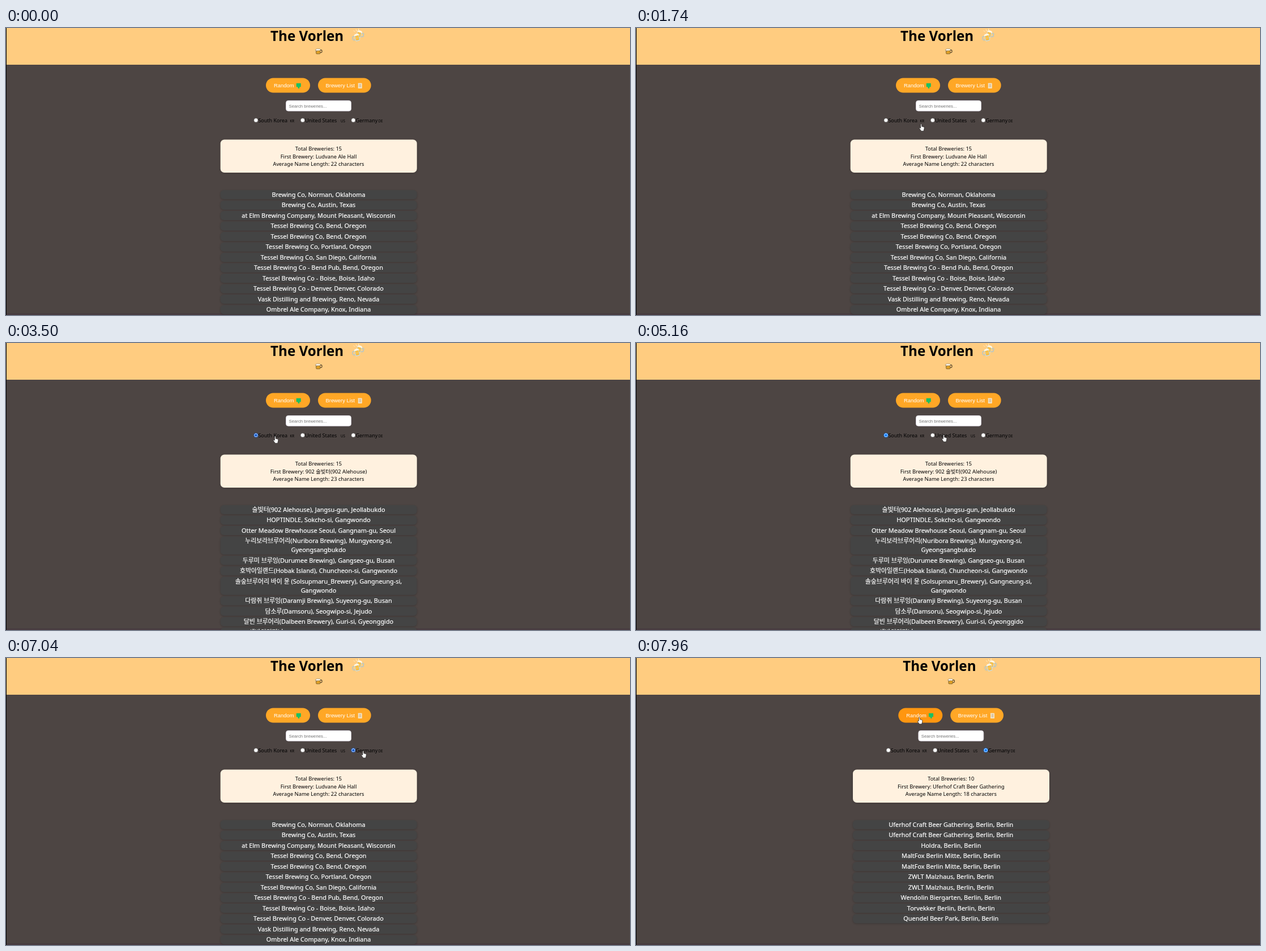
Recreate the animation shown at these times as an HTML page. Size 1102 by 508 pixels, loop 7990 ms.

```html
<!DOCTYPE html>
<html lang="en">
<head>
<meta charset="utf-8">
<title>Brewery finder</title>
<style>
  html, body { margin: 0; width: 100%; height: 100%; overflow: hidden; background: #4d4543; }
  svg { display: block; width: 100%; height: 100%; }
  text { font-family: "Noto Sans", "Noto Sans CJK KR", sans-serif; font-size: 9.3px; white-space: pre; }
  .mid { text-anchor: middle; }
  .title { font-size: 24.2px; font-weight: 700; }
  .ui { font-family: "Liberation Sans", Arial, sans-serif; font-size: 9.4px; fill: #fff; }
  .hint { font-size: 7.78px; fill: #757575; }
  .label { font-size: 9px; }
  .flag { font-size: 6.2px; }
  .item { font-size: 10.9px; fill: #fff; stroke: #fff; stroke-width: .2px; }
  .row { fill: #444; filter: drop-shadow(0 1px 1.5px rgba(0, 0, 0, .2)); }
  .card { fill: #fff1df; filter: drop-shadow(0 1px 2px rgba(0, 0, 0, .15)); }
</style>
</head>
<body>
<svg id="stage" viewBox="0 0 1102 508" preserveAspectRatio="none">
  <defs>
    <g id="mug">
      <path d="M11 5h3q2 0 2 2v4q0 2-2 2h-3" fill="none" stroke="#a9c6d2" stroke-width="1.6"/>
      <path d="M1 3h10v12q0 2-2 2H3q-2 0-2-2z" fill="#c5dce3"/>
      <path d="M2.3 5h7.4v9q0 1.3-1.3 1.3H3.6Q2.3 15.3 2.3 14z" fill="#f6b93b"/>
      <path d="M4.5 7v6M7.5 7v6" stroke="#ffd978" stroke-width="1"/>
      <path d="M.5 5q-1-3 2-3 2-2.5 4.5-.8 2-1 3.2.9 2.500.4 1.300 2.900z" fill="#fff6e2"/>
    </g>
    <g id="pint">
      <path d="M10 3h2q1.600 0 1.600 1.600v2q0 1.600-1.600 1.600h-2" fill="none" stroke="#4a3a20" stroke-width="1.300"/>
      <path d="M2 3h8v6.500q0 1.200-1.200 1.200H3.200Q2 10.700 2 9.500z" fill="#f3b22c" stroke="#3d2e18" stroke-width=".8"/>
      <path d="M4.600 5v4M7.300 5v4" stroke="#a56a10" stroke-width=".8"/>
      <path d="M1 4Q-.2 1.500 2.200 1.300 4-.4 6 .7 9-.2 9.800 1.400 11.300 3 10 4q-3 .8-5.500 0l-.6 1.800-1-.2-.2-1.500z" fill="#fff9ec" stroke="#5b4a30" stroke-width=".5"/>
    </g>
  </defs>
  <rect width="1102" height="508" fill="#4d4543"/>
  <rect width="1102" height="65" fill="#ffcc80"/>
  <rect y="505" width="1102" height="3" fill="#483c40"/>
  <rect width="1" height="508"/>
  <g id="page">
    <text class="title" x="467" y="22.600">The Vorlen</text>
    <g id="cheers">
      <use href="#mug" transform="translate(621 2.500) rotate(16) scale(.8)"/>
      <use href="#mug" transform="translate(623 8.500) rotate(-14) scale(-.8 .8)"/>
      <path d="M618 2.500l1.200 3M623 1l-.6 3M614 4.500l2 2" stroke="#fff4d6" stroke-width="1"/>
    </g>
    <use href="#pint" transform="translate(546 36.300) scale(.88)"/>
    <rect id="random" x="459" y="88.500" width="78" height="26" rx="13" fill="#ffa726"/>
    <rect x="551" y="88.500" width="93.700" height="26" rx="13" fill="#ffa726"/>
    <text class="ui" x="473" y="105.200">Random</text>
    <text class="ui" x="564.500" y="105.200">Brewery List</text>
    <path d="M513 98h7.500v6h-2.500v2.700h-1.800l-.7-2.700H513z" fill="#18c063" stroke="#18c063" stroke-width=".6" stroke-linejoin="round"/>
    <path d="M622 97.500h6q1.200.4.800 2v6q.4 1.500-1 1.500h-5.600q-1.200-.8-.4-2v-5.600q-.8-1.400.2-1.900z" fill="#f3e3c3"/>
    <path d="M623.500 100h3.600M623.500 102h3.600M623.500 104h3.600" stroke="#a98f6b" stroke-width=".7"/>
    <rect x="494.500" y="128.500" width="115" height="18.500" rx="4" fill="#fff" stroke="#dcd8e4" stroke-width=".8"/>
    <text class="ui hint" x="499.500" y="140.700">Search breweries...</text>
    <g id="radios"></g>
    <rect class="card" x="378.700" y="197.500" width="347" height="58.500" rx="7"/>
    <g id="stats"></g>
    <g id="lists"></g>
  </g>
  <g id="cursor" stroke="#1d1a1a" stroke-width=".7" stroke-linejoin="round" fill="#fff">
    <path id="hand" d="M2.400 1.300Q3.400-.4 4.400 1.300V4.700L7.700 5.600Q9 6 8.900 7.300L8.300 10.500 7.600 12.900H3.400L.6 9Q-.3 7.500.8 7 1.600 6.800 2.400 7.900Z"/>
    <path id="arrow" d="M3 0V9.600L5.100 7.700 6.500 10.900 7.900 10.300 6.500 7.200H9.300Z"/>
  </g>
</svg>
<script>
const LOOP = 7990;
const $ = id => document.getElementById(id);

function add(parent, tag, attrs, content) {
  const el = document.createElementNS("http://www.w3.org/2000/svg", tag);
  for (const key in attrs) el.setAttribute(key, attrs[key]);
  if (content) el.textContent = content;
  parent.appendChild(el);
  return el;
}

const countries = {
  KR: {
    total: 15, first: "902 술빚터(902 Alehouse)", average: 23,
    items: [
      "술빚터(902 Alehouse), Jangsu-gun, Jeollabukdo",
      "HOPTINDLE, Sokcho-si, Gangwondo",
      "Otter Meadow Brewhouse Seoul, Gangnam-gu, Seoul",
      "누리보라브루어리(Nuribora Brewing), Mungyeong-si,\nGyeongsangbukdo",
      "두루미 브루잉(Durumee Brewing), Gangseo-gu, Busan",
      "호박아일랜드(Hobak Island), Chuncheon-si, Gangwondo",
      "솔숲브루어리 바이 윤 (Solsupmaru_Brewery), Gangneung-si,\nGangwondo",
      "다람쥐 브루잉(Daramji Brewing), Suyeong-gu, Busan",
      "담소루(Damsoru), Seogwipo-si, Jejudo",
      "달빈 브루어리(Dalbeen Brewery), Guri-si, Gyeonggido",
      "새바위컴퍼니(Saebawi Beer Co), Jongno-gu, Seoul"
    ]
  },
  US: {
    total: 15, first: "Ludvane Ale Hall", average: 22,
    items: [
      "Brewing Co, Norman, Oklahoma",
      "Brewing Co, Austin, Texas",
      "at Elm Brewing Company, Mount Pleasant, Wisconsin",
      "Tessel Brewing Co, Bend, Oregon",
      "Tessel Brewing Co, Bend, Oregon",
      "Tessel Brewing Co, Portland, Oregon",
      "Tessel Brewing Co, San Diego, California",
      "Tessel Brewing Co - Bend Pub, Bend, Oregon",
      "Tessel Brewing Co - Boise, Boise, Idaho",
      "Tessel Brewing Co - Denver, Denver, Colorado",
      "Vask Distilling and Brewing, Reno, Nevada",
      "Ombrel Ale Company, Knox, Indiana"
    ]
  },
  DE: {
    total: 10, first: "Uferhof Craft Beer Gathering", average: 18,
    items: [
      "Uferhof Craft Beer Gathering, Berlin, Berlin",
      "Uferhof Craft Beer Gathering, Berlin, Berlin",
      "Holdra, Berlin, Berlin",
      "MaltFox Berlin Mitte, Berlin, Berlin",
      "MaltFox Berlin Mitte, Berlin, Berlin",
      "ZWLT Malzhaus, Berlin, Berlin",
      "ZWLT Malzhaus, Berlin, Berlin",
      "Wendolin Biergarten, Berlin, Berlin",
      "Torvekker Berlin, Berlin, Berlin",
      "Quendel Beer Park, Berlin, Berlin"
    ]
  }
};

for (const data of Object.values(countries)) {
  data.group = add($("lists"), "g", {});
  let y = 287;
  for (const item of data.items) {
    const lines = item.split("\n");
    const height = 15.9 * lines.length;
    add(data.group, "rect", { class: "row", x: 378.7, y, width: 347, height, rx: 6 });
    lines.forEach((line, i) =>
      add(data.group, "text", { class: "item mid", x: 552, y: y + 11.9 + 15.8 * i }, line));
    y += height + 2.6;
  }
}

const stats = [217.3, 230.7, 244].map(y => add($("stats"), "text", { class: "mid", x: 552, y }));

const radios = [
  { code: "KR", name: "South Korea", x: 437, flag: 501.5, end: 511 },
  { code: "US", name: "United States", x: 519.5, flag: 591, end: 600.5 },
  { code: "DE", name: "Germany", x: 609, flag: 657.5, end: 666 }
];
for (const r of radios) {
  r.ring = add($("radios"), "circle", { cx: r.x + 4.4, cy: 163.2, r: 3.5, fill: "#fff" });
  r.dot = add($("radios"), "circle", { cx: r.x + 4.4, cy: 163.2, r: 2.2 });
  add($("radios"), "text", { class: "label", x: r.x + 8.4, y: 166.7 }, r.name);
  add($("radios"), "text", { class: "flag", x: r.flag, y: 166.7 }, r.code);
}

// Pointer stops: time, x, y
const path = [
  [120, 1024, 498], [200, 985, 400], [320, 880, 230], [430, 800, 140], [530, 765, 114],
  [840, 765, 114], [930, 690, 135], [1030, 591, 163],
  [1470, 591, 163], [1600, 562, 168], [1740, 500.5, 169.5], [1850, 482, 167], [1950, 472, 164.5],
  [4600, 472, 164.5], [4720, 512, 166], [4850, 540, 162],
  [5950, 540, 162], [6050, 565, 165], [6190, 604.5, 164], [6280, 623, 165],
  [6520, 623, 165], [6650, 627, 160], [6770, 627.5, 164],
  [7270, 627.5, 164], [7450, 600, 150], [7700, 520, 112], [7850, 501, 100], [7960, 497, 104]
];

function pointerAt(t) {
  const i = path.findIndex(p => p[0] > t);
  if (i < 0) return path[path.length - 1].slice(1);
  if (i === 0) return path[0].slice(1);
  const [a, b] = [path[i - 1], path[i]];
  const k = (t - a[0]) / (b[0] - a[0]);
  return [a[1] + (b[1] - a[1]) * k, a[2] + (b[2] - a[2]) * k];
}

const show = (el, on) => el.setAttribute("display", on ? "inline" : "none");
const clamp = v => Math.max(0, Math.min(1, v));

function draw(t) {
  const checked = t < 3290 ? "" : t < 5300 ? "KR" : t < 7040 ? "US" : "DE";
  const listed = t >= 7110 ? "DE" : t >= 3500 && t < 5520 ? "KR" : "US";
  // The short list needs no scrollbar, so the centred page shifts.
  const shift = listed === "DE" ? 4.3 : 0;
  $("page").setAttribute("transform", `translate(${shift} 0)`);

  const data = countries[listed];
  for (const c of Object.values(countries)) show(c.group, c === data);
  stats[0].textContent = `Total Breweries: ${data.total}`;
  stats[1].textContent = `First Brewery: ${data.first}`;
  stats[2].textContent = `Average Name Length: ${data.average} characters`;

  const [x, y] = pointerAt(t);
  const tip = x + 3 - shift;
  let link = tip > 459 && tip < 537 && y > 88.5 && y < 114.5;
  for (const r of radios) {
    const over = t >= 120 && tip > r.x && tip < r.end && y > 156 && y < 171.5;
    const on = r.code === checked;
    const blue = over ? "#0a55cc" : "#0075ff";
    r.ring.setAttribute("stroke", on ? blue : over ? "#4f4f4f" : "#767676");
    r.ring.setAttribute("stroke-width", on ? 1 : .6);
    r.dot.setAttribute("fill", blue);
    show(r.dot, on);
    link = link || over;
  }
  const warm = clamp((t - 7690) / 200);
  $("random").setAttribute("fill", `rgb(255,${167 - 17 * warm},${38 - 22 * warm})`);

  show($("cursor"), t >= 120);
  $("cursor").setAttribute("transform", `translate(${x} ${y})`);
  show($("hand"), link);
  show($("arrow"), !link);
}

const start = performance.now();
function tick() {
  draw((performance.now() - start) % LOOP);
  requestAnimationFrame(tick);
}
tick();
</script>
</body>
</html>
```
